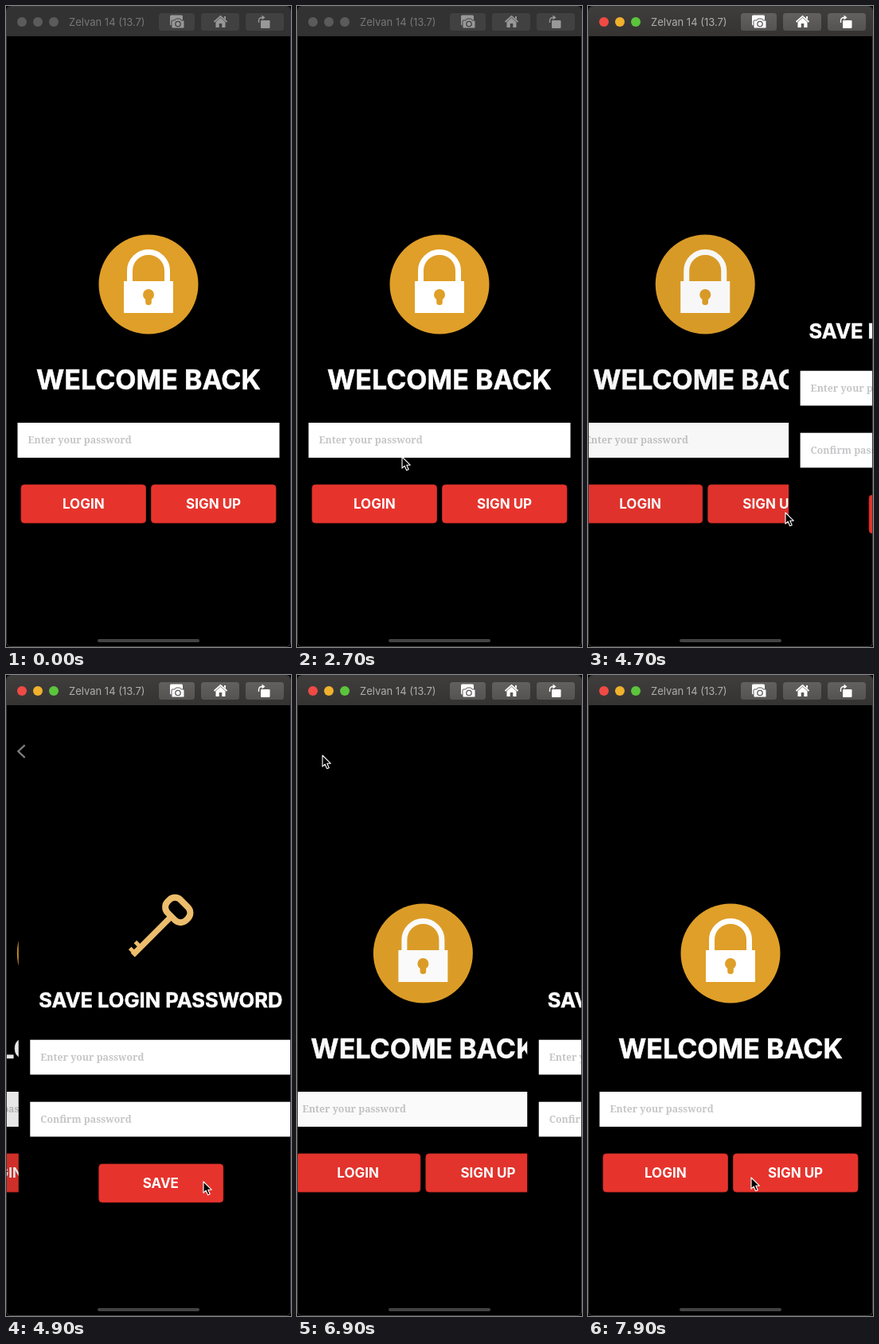
An HTML page for the animation above (8000 ms loop, 358 by 806 pixels).

```html
<!DOCTYPE html>
<html lang="en">
<head>
<meta charset="utf-8">
<title>Password screens</title>
<style>
  html, body { margin: 0; width: 100%; height: 100%; overflow: hidden; background: #000; }
  svg { display: block; width: 358px; height: 806px; }
  text { font-family: Inter, "Open Sans", sans-serif; }
  .heading, .label { fill: #fff; font-weight: 700; text-anchor: middle; }
  .heading { stroke: #fff; stroke-width: .5; }
  .label { font-size: 17px; }
  .hint { fill: #c6c6c8; font: 600 12.3px "Noto Serif", serif; }
  .button { fill: #e6342d; stroke: #d02e28; stroke-width: .8; }
  .bar { fill: #323232; }
  .tool { fill: #414141; }
  .dot { fill: #5b5b5b; }
  .device { fill: #777; font-size: 13px; }
  .icons { color: #989898; --gap: #414141; }
  .active .bar { fill: url(#barFill); }
  .active .tool { fill: url(#toolFill); }
  .active .red { fill: #f04a45; }
  .active .yellow { fill: #f0b12d; }
  .active .green { fill: #5bc53c; }
  .active .device { fill: #b0adac; }
  .active .icons { color: #fff; --gap: #5b5959; }
</style>
</head>
<body>
<svg viewBox="0 0 358 806">
  <defs>
    <linearGradient id="barFill" x2="0" y2="1">
      <stop stop-color="#403e3d"/><stop offset="1" stop-color="#353332"/>
    </linearGradient>
    <linearGradient id="toolFill" x2="0" y2="1">
      <stop stop-color="#636160"/><stop offset="1" stop-color="#555352"/>
    </linearGradient>
    <clipPath id="screen"><rect x="1" y="38" width="356" height="767"/></clipPath>
  </defs>
  <rect width="358" height="806"/>

  <g clip-path="url(#screen)">
    <g id="welcome">
      <circle cx="179" cy="350" r="62.5" fill="#df9f28"/>
      <path d="M155.5 348V333a23.5 23.5 0 0 1 47 0V348" fill="none" stroke="#fff" stroke-width="7"/>
      <rect x="148" y="346" width="62" height="40" fill="#fff"/>
      <g fill="#df9f28">
        <circle cx="179" cy="363" r="7"/>
        <rect x="175.2" y="364" width="7.6" height="12" rx="3.5"/>
      </g>
      <text class="heading" x="179" y="482" font-size="34">WELCOME BACK</text>
      <rect x="14.5" y="524" width="329" height="44" fill="#fff"/>
      <text class="hint" x="27.5" y="550">Enter your password</text>
      <rect class="button" x="19" y="602" width="156.5" height="48" rx="4"/>
      <text class="label" x="97.3" y="632">LOGIN</text>
      <rect class="button" x="182.5" y="602" width="156.5" height="48" rx="4"/>
      <text class="label" x="260.6" y="632">SIGN UP</text>
    </g>
    <rect id="dim" width="358" height="806"/>

    <g id="save">
      <rect width="358" height="806"/>
      <g transform="translate(200 295.5) rotate(135)" fill="none" stroke="#ecbd6c">
        <rect x="-11.5" y="-16.5" width="23" height="33" rx="10" stroke-width="8"/>
        <path d="M14 0H80" stroke-width="7.4"/>
        <path d="M66 0V9.5M76.5 0V8.5" stroke-width="5"/>
      </g>
      <text class="heading" x="178.5" y="418" font-size="25.5">SAVE LOGIN PASSWORD</text>
      <rect x="14.5" y="458.7" width="329" height="43.8" fill="#fff"/>
      <text class="hint" x="27.5" y="485">Enter your password</text>
      <rect x="14.5" y="536.7" width="329" height="43.8" fill="#fff"/>
      <text class="hint" x="27.5" y="563">Confirm password</text>
      <rect class="button" x="101" y="615" width="156" height="48" rx="4"/>
      <text class="label" x="178.5" y="645">SAVE</text>
    </g>
    <path id="back" d="M5 -8.5L-4 0L5 8.5" fill="none" stroke="#fff" stroke-width="2.4"/>
    <path d="M117 798H241" stroke="#434343" stroke-width="4" stroke-linecap="round"/>
  </g>

  <g id="chrome">
    <path class="bar" d="M1 38V6Q1 1 6 1H352Q357 1 357 6V38Z"/>
    <rect x=".5" y=".5" width="357" height="805" rx="5" fill="none" stroke="#3a3a3a"/>
    <circle class="dot red" cx="20" cy="20" r="6"/>
    <circle class="dot yellow" cx="40" cy="20" r="6"/>
    <circle class="dot green" cx="60" cy="20" r="6"/>
    <text class="device" x="79" y="25">Zelvan 14 (13.7)</text>
    <rect class="tool" x="192" y="9" width="45" height="22" rx="3.5"/>
    <rect class="tool" x="245" y="9" width="48" height="22" rx="3.5"/>
    <rect class="tool" x="301" y="9" width="48" height="22" rx="3.5"/>
    <g class="icons" fill="currentColor">
      <rect x="206" y="11.5" width="16" height="13" rx="1.5"/>
      <path d="M209 18h3l1.5-2h5l1.5 2h3q1 0 1 1v8q0 1-1 1h-14q-1 0-1-1v-8q0-1 1-1Z"
            style="stroke: var(--gap)" stroke-width="1"/>
      <circle cx="216" cy="22.5" r="3.2" fill="none" style="stroke: var(--gap)" stroke-width="1.3"/>
      <path d="M261.5 20L269.5 12.8L277.5 20" fill="none" stroke="currentColor" stroke-width="1.7"/>
      <path d="M274 13h2v4l-2-1.8ZM263.5 20.2l6-5.4l6 5.4V27h-4.2v-5h-3.6v5h-4.2Z"/>
      <rect x="320" y="18" width="11.5" height="10" rx="1.2"/>
      <path d="M317.5 21V18.5Q317.5 14.5 322 14.5" fill="none" stroke="currentColor" stroke-width="1.4"/>
      <path d="M321.5 11.5L325.5 14.5L321.5 17.5Z"/>
    </g>
  </g>

  <path id="cursor" d="M0 0V14.2L3.2 11.2L5.6 16.8L8.2 15.7L5.8 10.2H10.2Z"
        fill="#000" stroke="#fff" stroke-width="1.1" stroke-linejoin="round"/>
</svg>
<script>
  const LOOP = 8000, WIDTH = 358, PUSH = 4644, POP = 6741;
  const [welcome, dim, save, back, chrome, cursor] =
    ["welcome", "dim", "save", "back", "chrome", "cursor"].map(id => document.getElementById(id));

  // Pointer stops: time, x, y
  const stops = [
    [2300, 146, 666], [2700, 132, 567], [3200, 150, 560], [3700, 170, 575], [4400, 248, 637],
    [5600, 248, 637], [5900, 46, 109], [6100, 32, 101], [7000, 32, 101], [7800, 205, 632], [LOOP, 205, 632]
  ];

  const clamp = v => Math.min(1, Math.max(0, v));
  const smooth = v => v * v * (3 - 2 * v);

  // Critically damped spring from 0 to 1
  function spring(ms) {
    const a = Math.max(0, ms) * 0.01905;
    return 1 - (1 + a) * Math.exp(-a);
  }

  function pointerAt(t) {
    const i = stops.findIndex(stop => stop[0] > t);
    if (i < 1) return null;
    const [t0, x0, y0] = stops[i - 1], [t1, x1, y1] = stops[i];
    const k = smooth((t - t0) / (t1 - t0));
    return [x0 + (x1 - x0) * k, y0 + (y1 - y0) * k];
  }

  const move = (el, x, y, extra = "") => el.setAttribute("transform", `translate(${x} ${y}) ${extra}`);

  function draw(t) {
    const shown = t < POP ? spring(t - PUSH) : 1 - spring(t - POP);
    move(welcome, -0.3 * WIDTH * shown, 0);
    dim.setAttribute("opacity", 0.1 * shown);
    move(save, WIDTH * (1 - shown), 0);

    const arrow = t < POP ? clamp((t - PUSH - 60) / 400) : clamp(1 - (t - POP) / 150);
    back.setAttribute("opacity", arrow);
    move(back, 17 + 4 * (1 - arrow), 95 + 2 * (1 - arrow), `scale(${0.85 + 0.15 * arrow})`);

    chrome.setAttribute("class", t >= 3200 ? "active" : "");

    const pointer = pointerAt(t);
    cursor.setAttribute("visibility", pointer ? "visible" : "hidden");
    if (pointer) move(cursor, ...pointer);
  }

  function tick() {
    draw(performance.now() % LOOP);
    requestAnimationFrame(tick);
  }
  tick();
</script>
</body>
</html>
```
